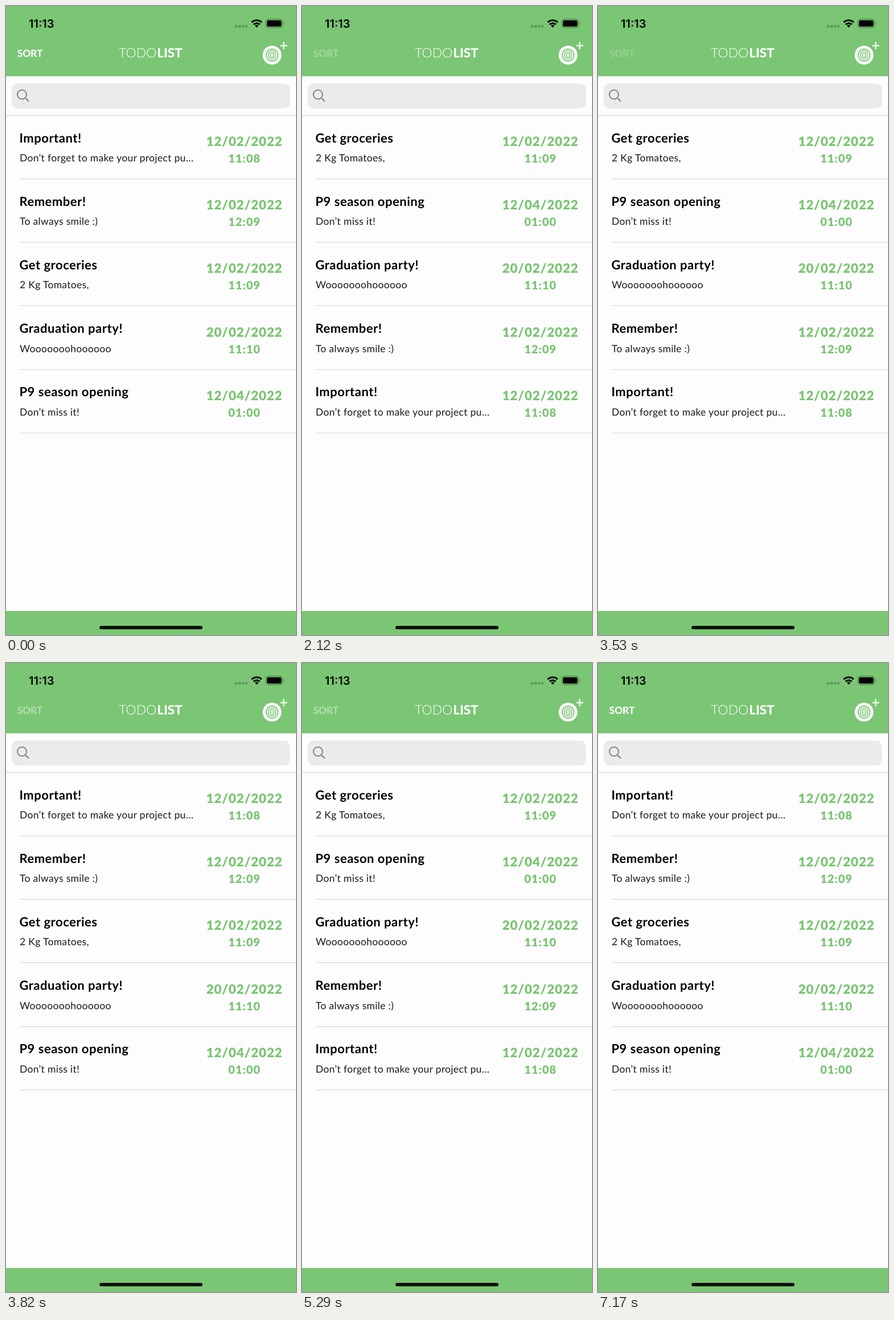
These frames come from a looping animation (509 by 1101 pixels, 7.23 s). An HTML page:

```html
<!DOCTYPE html>
<html lang="en">
<head>
<meta charset="utf-8">
<style>
  html, body { margin: 0; height: 100%; overflow: hidden; background: #fdfdfd; }
  svg { display: block; width: 509px; height: 1101px; font-family: Lato, sans-serif; text-rendering: geometricPrecision; }
  .title { font-size: 22px; font-weight: 700; letter-spacing: .5px; }
  .note { font-size: 17.5px; letter-spacing: .32px; fill: #1a1a1a; }
  .date, .time { font-weight: 900; text-anchor: middle; fill: #7ac572; }
  .date { font-size: 22.5px; letter-spacing: .8px; }
  .time { font-size: 20px; letter-spacing: 1px; }
  .line { shape-rendering: crispEdges; }
</style>
</head>
<body>
<svg viewBox="0 0 509 1101">
  <rect width="509" height="1101" fill="#fdfdfd"/>
  <path d="M0 0H509V123H0ZM0 1059H509V1101H0Z" fill="#7bc674"/>
  <rect x="164" y="1085" width="181" height="6" rx="3" fill="#0b120b"/>

  <!-- status bar -->
  <text x="40" y="38" font-family="Inter, sans-serif" font-size="20" font-weight="600">11:13</text>
  <path d="M401.5 35.5h23" stroke="#5f9c5a" stroke-width="4.6" stroke-dasharray="4.6 1.5"/>
  <g fill="none" stroke="#000" stroke-width="3">
    <path d="M431.3 28.6a12.4 12.4 0 0 1 17.4 0M434.6 32.4a7.7 7.7 0 0 1 10.8 0"/>
    <path d="M440 38l-3-3.2a4.3 4.3 0 0 1 6 0Z" fill="#000" stroke="none"/>
  </g>
  <rect x="456.2" y="23.2" width="29" height="14.6" rx="4.2" fill="none" stroke="#000" stroke-opacity=".4" stroke-width="1.2"/>
  <rect x="458" y="25" width="25.4" height="11" rx="2.6"/>
  <path d="M486.6 28.2q2.6 2.3 0 4.6Z" opacity=".5"/>

  <!-- navigation bar -->
  <g fill="#fff">
    <text id="sort" x="19.7" y="88.6" font-size="17.2" font-weight="800">SORT</text>
    <text x="198" y="90" font-size="23" font-weight="300">TODO</text>
    <text x="265.3" y="90" font-size="22.3" font-weight="800">LIST</text>
    <circle cx="467" cy="86" r="16.5"/>
    <g fill="none" stroke="#7bc674" stroke-width="1.8">
      <circle cx="467" cy="86" r="10.5"/>
      <circle cx="467" cy="86" r="6.6"/>
      <circle cx="467" cy="86" r="3" stroke-width="1.4"/>
    </g>
    <path d="M481.3 69.5h12.4M487.5 63.3v12.4" stroke="#fff" stroke-width="2.2"/>
  </g>

  <!-- search field -->
  <rect x="10" y="135.5" width="488.5" height="44" rx="11" fill="#ebebeb"/>
  <path d="M34.3 161.3L40 167" stroke="#838386" stroke-width="2.2"/>
  <circle cx="28" cy="155" r="8" fill="none" stroke="#838386" stroke-width="2"/>
  <path class="line" d="M0 191.5H509" stroke="#cfcfd6"/>

  <g id="byTime"></g>
  <g id="byName"></g>
</svg>
<script>
const byId = id => document.getElementById(id);
const LOOP = 7230, FADE = 530, STEPS = 9, ROW = 111.2;

const items = [
  ['Important!', 'Don’t forget to make your project pu…', '12/02/2022', '11:08'],
  ['Remember!', 'To always smile :)', '12/02/2022', '12:09'],
  ['Get groceries', '2 Kg Tomatoes,', '12/02/2022', '11:09'],
  ['Graduation party!', 'Wooooooohoooooo', '20/02/2022', '11:10'],
  ['P9 season opening', 'Don’t miss it!', '12/04/2022', '01:00'],
];

const row = ([title, note, date, time], i) => `
  <g transform="translate(0 ${i * ROW})">
    <text class="title" x="23.5" y="238.5">${title}</text>
    <text class="note" x="24" y="272">${note}</text>
    <text class="date" x="418.4" y="245">${date}</text>
    <text class="time" x="418.5" y="274">${time}</text>
    <path class="line" d="M24.5 302.5H509" stroke="#d3d3df"/>
  </g>`;

byId('byTime').innerHTML = items.map(row).join('');
byId('byName').innerHTML = [2, 4, 3, 1, 0].map((n, i) => row(items[n], i)).join('');

// each tap: [finger down, finger up]; the list is reordered on release
const taps = [[1880, 2000], [3530, 3640], [5050, 5110], [6520, 6640]];
const ease = p => p * p * (3 - 2 * p);

function sortOpacity(t) {
  const tap = taps.findLast(([down]) => t >= down);
  if (!tap) return 1;
  if (t < tap[1]) return 0.2;
  const step = Math.floor((t - tap[1]) / FADE * STEPS + 0.01);
  return 0.2 + 0.8 * ease(Math.min(1, step / STEPS));
}

function draw() {
  const t = performance.now() % LOOP;
  const sorted = taps.filter(([, up]) => t >= up).length % 2 === 1;
  byId('byTime').style.display = sorted ? 'none' : '';
  byId('byName').style.display = sorted ? '' : 'none';
  byId('sort').style.opacity = sortOpacity(t);
  requestAnimationFrame(draw);
}
draw();
</script>
</body>
</html>
```
